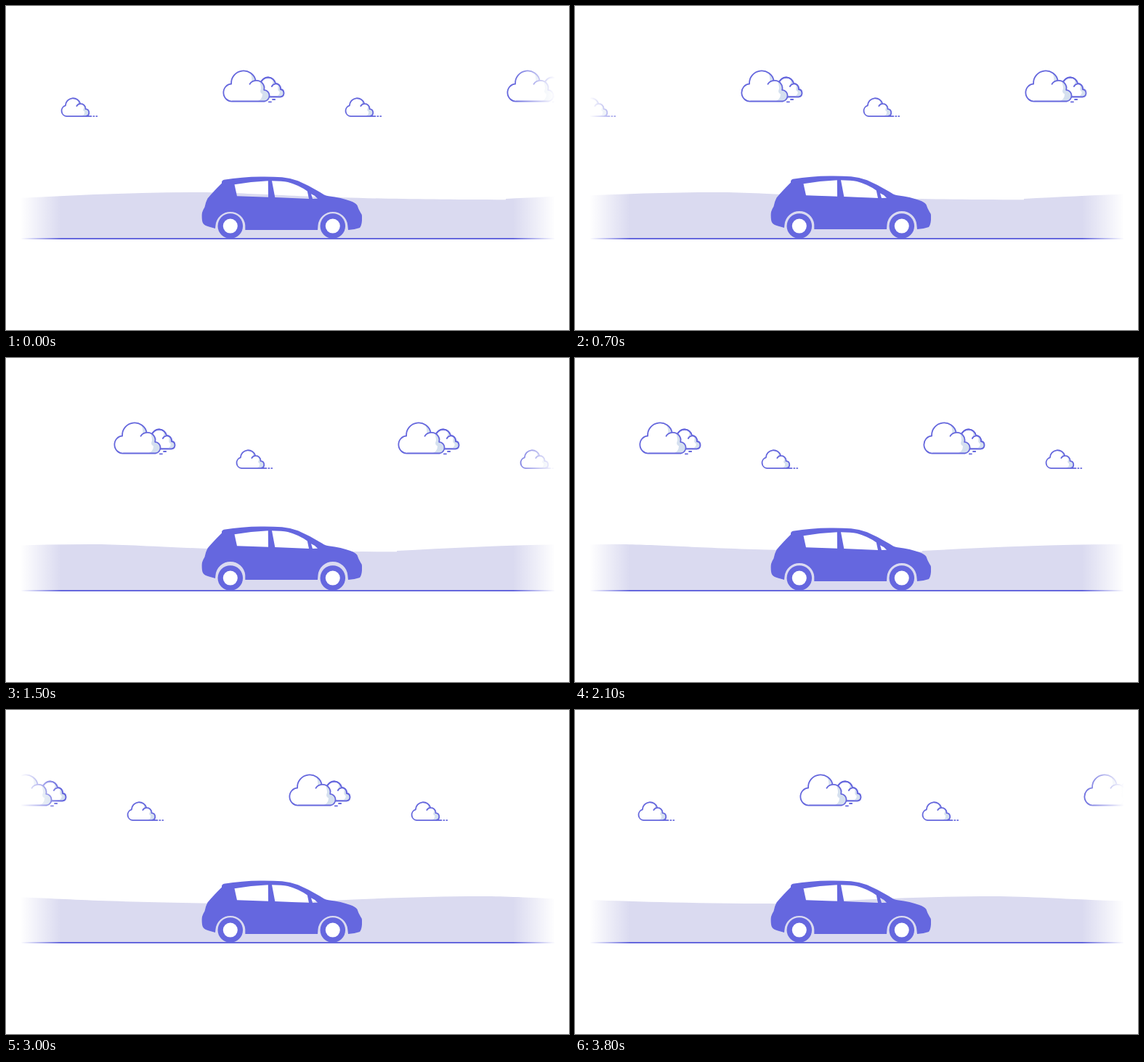
Recreate the animation shown at these times as an HTML page. Size 775x447 px, loop 3900 ms.

```html
<!DOCTYPE html>
<html lang="en">
<head>
<meta charset="utf-8">
<title>Driving car</title>
<style>
  html, body { margin: 0; width: 100%; height: 100%; overflow: hidden; background: #fff; }
  svg { display: block; }
  .line { stroke: #6567dd; stroke-width: 1.8; stroke-linecap: round; stroke-linejoin: round; }
  .shade { fill: #d5e0ef; }
  .ink { fill: #6567df; }
</style>
</head>
<body>
<svg width="775" height="447" viewBox="0 0 775 447">
  <defs>
    <linearGradient id="fadeL">
      <stop offset="0" stop-color="#fff"/>
      <stop offset="1" stop-color="#fff" stop-opacity="0"/>
    </linearGradient>
    <linearGradient id="fadeR">
      <stop offset="0" stop-color="#fff" stop-opacity="0"/>
      <stop offset="1" stop-color="#fff"/>
    </linearGradient>

    <g id="clouds">
      <!-- large pair: rear cloud, then front cloud -->
      <path class="line" fill="#fff" d="M350.5 106.5A10.5 10.5 0 0 1 371 107A6.8 6.8 0 0 1 377.8 115A5.2 5.2 0 0 1 378 125.3H358"/>
      <path class="shade" d="M366 100.5Q369 103 370 106.6L366.5 108.5Q368 104 366 100.5ZM374 108.4Q377.5 111 377.2 115.6Q382.4 116 382.5 120.4Q382 124.2 378 124.4H373Q377.5 122 376.5 118Q373.5 116.500 374.500 113Z"/>
      <path class="line" fill="none" d="M350.5 106.500A10.5 10.5 0 0 1 371 107A6.8 6.8 0 0 1 377.8 115A5.2 5.2 0 0 1 378 125.3H358M365.800 111A6.500 6.500 0 0 1 371 107.300M367 129H370.200M361.800 132.300H365"/>
      <path id="big" fill="#fff" d="M311.500 131.500A11.400 12 0 0 1 310.100 107.500A17 17 0 0 1 343.700 102.900A10.500 10.500 0 0 1 355.200 115.800A7.900 7.900 0 0 1 355.800 131.500Z"/>
      <path class="shade" d="M334 90.200A17 17 0 0 1 343.700 102.900Q340.500 103 338 104.600Q339.500 96 334 90.200ZM348 103.400A10.500 10.500 0 0 1 355.200 115.800A7.900 7.900 0 0 1 355.800 131.500H346Q353 128.500 353 121.500Q348.500 119.500 351 114Q351 107 348 103.400Z"/>
      <path class="line" fill="none" d="M311.500 131.500A11.400 12 0 0 1 310.100 107.500A17 17 0 0 1 343.700 102.900A10.500 10.500 0 0 1 355.200 115.800A7.900 7.900 0 0 1 355.800 131.500ZM335.500 107.700A10.500 10.500 0 0 1 343.700 102.900"/>
      <!-- small cloud -->
      <path class="shade" d="M97 127.500Q101 130.500 102 134.700L98.500 136.500Q100 131 97 127.500ZM105.500 135.800Q109.500 138 109.500 142A5 5 0 0 1 110 152H104Q109 149.500 108 145.500Q105 144 107 141Q107.500 138 105.500 135.800Z"/>
      <path class="line" fill="none" d="M117.500 152.100H83.200A7.200 7.500 0 0 1 81.800 137.400A10.500 10.500 0 0 1 102.400 134.900A6.700 6.700 0 0 1 109.500 142.100A5 5 0 0 1 110.200 152M97.300 138A6.500 6.500 0 0 1 102.400 134.900M120.300 152.100H121.400M124.200 152.100H125.300"/>
    </g>

    <path id="hill" fill="#dadaf0" d="M0 266C80 262 170 257 268 257C345 257 415 267 690 267.300V321H0Z"/>

    <g id="wheel">
      <circle class="ink" r="17.300"/>
      <circle fill="#fff" r="10"/>
    </g>
  </defs>

  <g id="land">
    <use href="#hill" x="-2"/>
    <use href="#hill" x="688"/>
  </g>
  <g id="sky">
    <use href="#clouds"/>
    <use href="#clouds" x="391"/>
    <use href="#clouds" x="782"/>
  </g>
  <path d="M20 321H757" stroke="#6567dd" stroke-width="2"/>
  <rect width="20.500" y="80" height="250" fill="#fff"/>
  <rect x="20" y="80" width="56" height="250" fill="url(#fadeL)"/>
  <rect x="698" y="80" width="58" height="250" fill="url(#fadeR)"/>
  <rect x="755.500" y="80" width="20" height="250" fill="#fff"/>

  <path id="body" class="ink" fill-rule="evenodd" d="
    M297 242.500Q297.500 240.300 300 239.700Q325 235.700 350 235.500Q367 235.300 380 236.300Q391 237.300 402 241.300
    Q420 249 438 260.500Q440 261.700 444 262.200Q462 264.500 474 269Q481 271.500 483.500 275Q485 280 488 285
    Q490 287.500 490 290V296Q489.500 303 487 306Q480 308.500 471 309
    L470.300 302.500A20.500 20.500 0 0 0 429.500 302.500L429 309H329.300
    L329.300 302.500A20.500 20.500 0 0 0 288.500 302.500L288 307
    Q279 304.800 274.500 302.800Q270.500 300.500 270 296Q269.200 289 270 285Q271.500 280.500 273.500 277.500Q275 270 277.500 265.500
    Q284 257.500 297 244.500Z
    M314.500 246.300Q337 242.300 360.800 241.300L361 263.800L318 262.300Z
    M366 241.300Q380 241.300 388 243Q403 247 414.800 255.500L417 266L370.300 264Z
    M420 259.300Q425.500 261.500 429 265.700L422 266Z"/>
  <use href="#wheel" x="308.800" y="303.600"/>
  <use href="#wheel" x="449.800" y="303.600"/>
</svg>
<script>
  const LOOP = 3900, STEP = 100;
  const SPEED = 0.1; // px per ms
  const [land, sky, body] = ["land", "sky", "body"].map(id => document.getElementById(id));
  const move = (el, x, y) => el.setAttribute("transform", `translate(${x} ${y})`);

  // Triangle wave between -4 and +1 px, one cycle per second
  function bounce(t) {
    const d = Math.abs((t % 1000) / 100 - 4);
    return Math.min(d, 10 - d) - 4;
  }

  function draw(ms) {
    const t = Math.floor((ms % LOOP) / STEP) * STEP;
    move(land, -t * SPEED, 0);
    move(sky, -t * SPEED, 0);
    move(body, 0, bounce(t));
  }

  const start = performance.now();
  function tick() {
    draw(performance.now() - start);
    requestAnimationFrame(tick);
  }
  tick();
</script>
</body>
</html>
```
